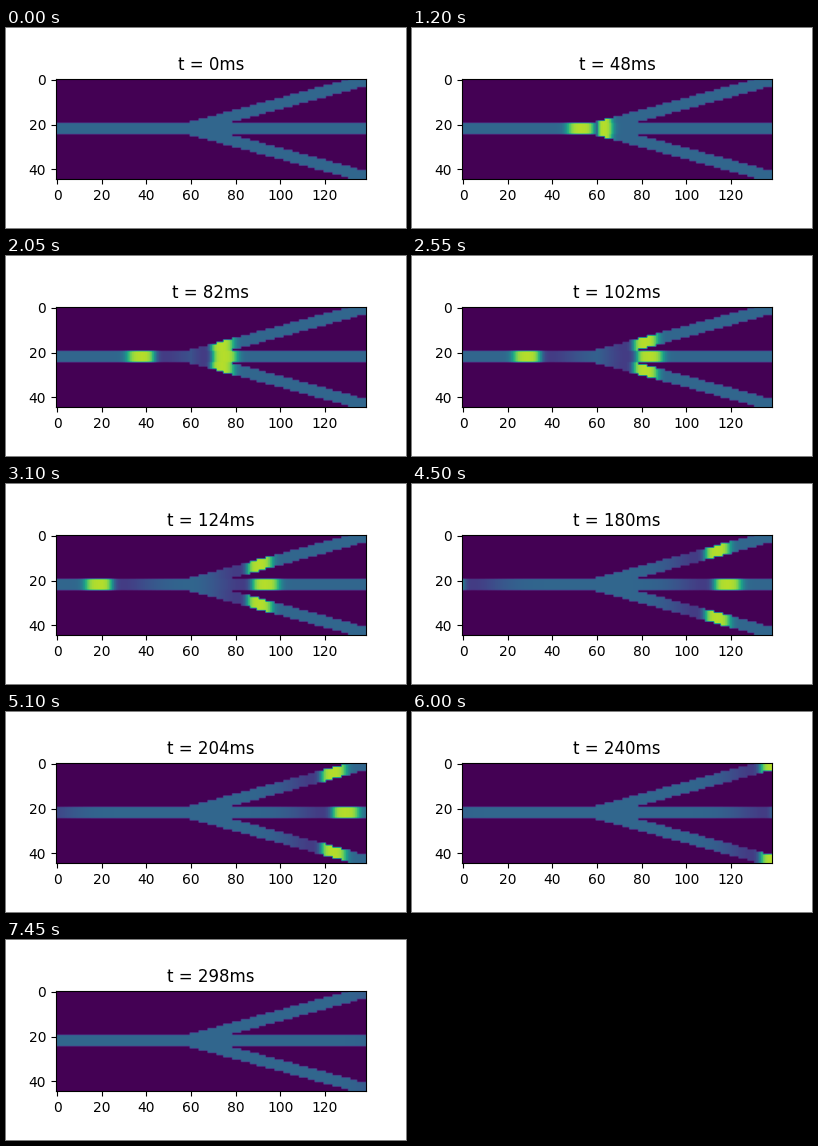
Recreate the animation shown at these times as a matplotlib script. Size 400 by 200 pixels, loop 7500 ms.

```python
import numpy as np
import matplotlib.pyplot as plt
from matplotlib.animation import FuncAnimation

ROWS, COLS, MID = 45, 139, 22
FRAMES, INTERVAL = 150, 50
MS_PER_FRAME = 2

REST, PEAK, LOW = 0.33, 0.89, 0.17
SOURCE, SOURCE_TIME = 60, 32
TRUNK_SPEED, BRANCH_SPEED = 0.45, 0.415  # columns per ms
JUNCTION_DELAY = 17.5

rows, cols = np.mgrid[:ROWS, :COLS]
height = np.abs(rows - MID)
distance = np.abs(cols - SOURCE)

# A straight trunk and two branches leaving it at 15 degrees.
trunk = height <= 2
axis = np.tan(np.radians(15)) * (cols - 58.275)
branches = (cols >= SOURCE) & (np.abs(height - axis) <= 2.547)
tissue = trunk | branches

# Time at which the pulse is centred on each cell; the wide junction slows it.
speed = np.where(trunk, TRUNK_SPEED, BRANCH_SPEED)
delay = JUNCTION_DELAY * (1 - np.exp(-distance / 5)) * (cols > SOURCE)
peak_time = SOURCE_TIME + distance / speed + delay


def sigmoid(x):
    return 1 / (1 + np.exp(-np.clip(x, -50, 50)))


def potential(t):
    s = t - peak_time
    rise = sigmoid((s + 13) / 2.3)
    fall = sigmoid((s - 13.5) / 2)
    excited = REST + (PEAK - REST) * rise
    rest_gap = np.exp(-(np.maximum(s - 19, 0) / 36) ** 2)
    recovering = REST - (REST - LOW) * rest_gap
    return np.where(tissue, excited * (1 - fall) + recovering * fall, 0)


fig, ax = plt.subplots(figsize=(4, 2), dpi=100)
image = ax.imshow(potential(0), vmin=0, vmax=1, cmap="viridis")
title = ax.set_title("t = 0ms")


def update(frame):
    t = frame * MS_PER_FRAME
    image.set_data(potential(t))
    title.set_text(f"t = {t}ms")
    return image, title


anim = FuncAnimation(fig, update, frames=FRAMES, interval=INTERVAL, repeat=True, repeat_delay=0)
plt.show()
```
